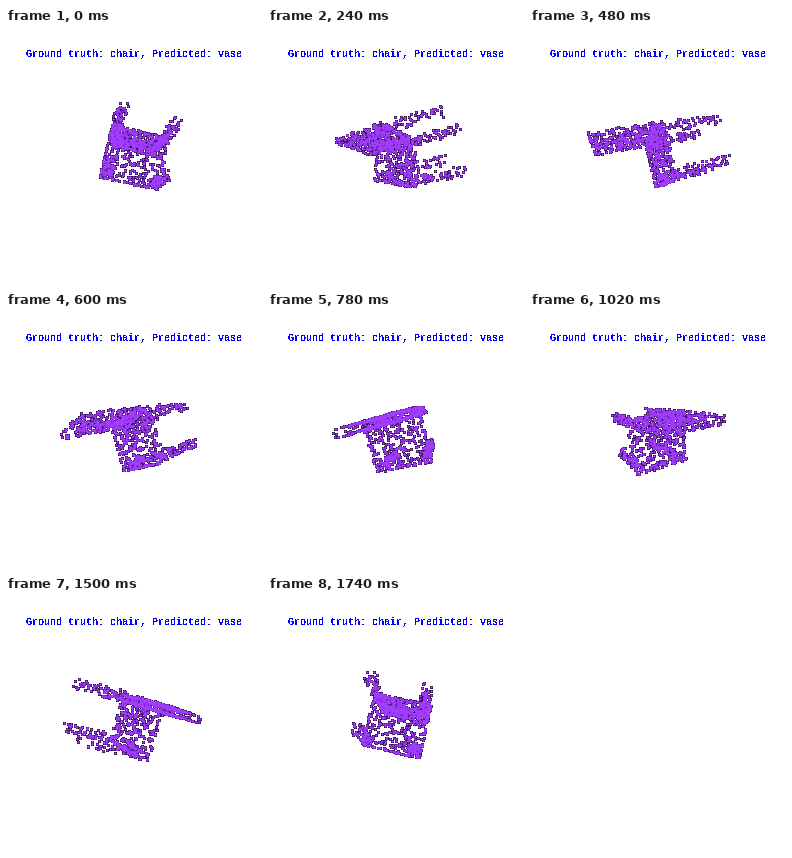
A matplotlib script that plays this animation: 256x256 px, repeating every 1800 ms.

```python
import numpy as np
import matplotlib.pyplot as plt
from matplotlib.animation import FuncAnimation

SIZE, DPI, FRAMES, STEP = 256, 100, 30, 60
PX = 72 / DPI
CAMERA = 220
rng = np.random.default_rng(4)

# Chair axes: toward the feet, across the seat, from front edge to back
LEG = np.array([8, 12, 62.0])
SIDE = np.array([57, -13, -4.8])
RISE = np.cross(LEG, SIDE)
AXES = np.array([v / np.linalg.norm(v) for v in (LEG, SIDE, RISE)])


def box(n, low, high):
    """Random points on the surface of a box."""
    low, high = np.array(low, float), np.array(high, float)
    size = high - low
    area = size.prod() / size
    axis = rng.choice(3, n, p=area / area.sum())
    pts = rng.random((n, 3))
    pts[np.arange(n), axis] = rng.integers(0, 2, n)
    return low + pts * size


def leg(n, start, end, radius=4.5):
    """Random points on a square post."""
    t = rng.random((n, 1))
    skin = box(n, (0, -radius, -radius), (1e-3, radius, radius))
    return np.array(start) + t * (np.array(end) - start) + skin


def chair():
    parts = [box(400, (-5, -29, -27), (5, 29, 26)),
             box(360, (-61, -28, 20), (0, 28, 27))]
    for s in (-1, 1):
        parts.append(leg(65, (2, 25 * s, 22), (62, 22 * s, 22)))
        parts.append(leg(70, (2, 24 * s, -22), (62, 20 * s, -19)))
    return np.vstack(parts) @ AXES


def project(pts, angle):
    """Pixel centres of the turned points in perspective."""
    x, y, z = pts.T
    c, s = np.cos(angle), np.sin(angle)
    zoom = CAMERA / (CAMERA - (z * c - x * s))
    xy = np.column_stack([(x * c + z * s) * zoom, y * zoom])
    return np.floor(xy + SIZE / 2) + 0.5


cloud = chair()
plt.rcParams["text.antialiased"] = False
fig = plt.figure(figsize=(SIZE / DPI, SIZE / DPI), dpi=DPI, facecolor="white")
ax = fig.add_axes([0, 0, 1, 1], xlim=(0, SIZE), ylim=(0, SIZE))
ax.axis("off")
# Two strikes one pixel apart give the heavy stems
for x in (127.5, 128.5):
    ax.text(x, SIZE - 29, "Ground truth: chair, Predicted: vase", color="blue",
            family="Liberation Mono", weight="bold", size=10 * PX, ha="center", va="baseline")


def dots(marker, width, color):
    return ax.scatter([], [], s=(width * PX) ** 2, marker=marker, color=color,
                      linewidth=0, antialiased=False)


layers = [dots("s", 3, "black"), dots("o", 2.5, "#a23cff")]


def update(i):
    xy = project(cloud, 2 * np.pi * i / FRAMES)
    for layer in layers:
        layer.set_offsets(xy)
    return layers


anim = FuncAnimation(fig, update, frames=FRAMES, interval=STEP, repeat=True, repeat_delay=0)
plt.show()
```
